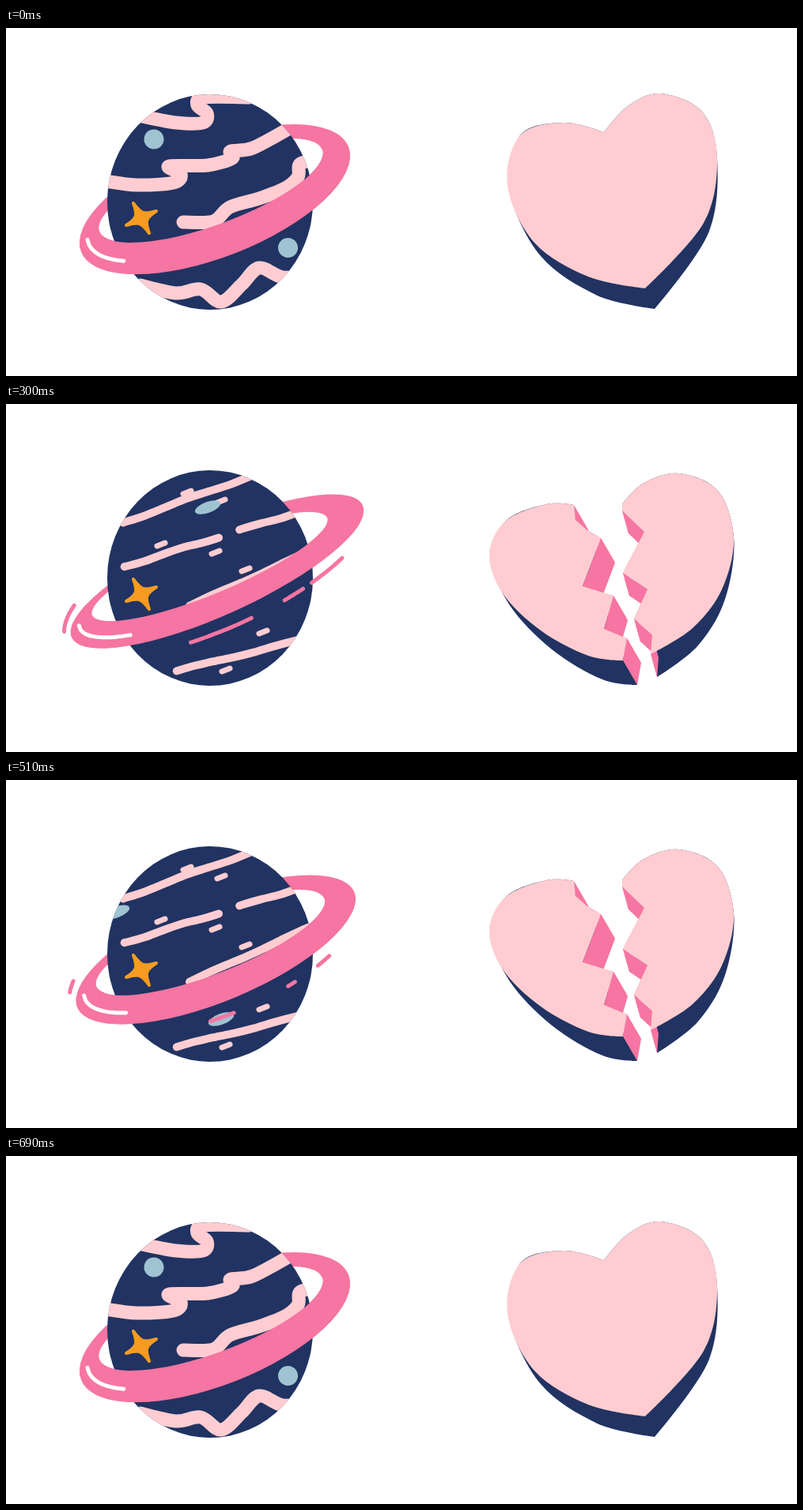
Recreate the animation shown at these times as an HTML page. Size 1000 by 441 pixels, loop 0.72 s.

```html
<!DOCTYPE html>
<html lang="en">
<head>
<meta charset="utf-8">
<title>Planet and heart</title>
<style>
html, body { margin: 0; width: 100%; height: 100%; overflow: hidden; background: #fff; }
svg { display: block; width: 100%; height: 100%; }
</style>
</head>
<body>
<svg id="stage" viewBox="0 0 1000 441"></svg>
<script>
const LOOP = 720, STEP = 30, DEG = Math.PI / 180;
const NAVY = '#213362', BLUSH = '#ffcdd1', PINK = '#f675a2', SKY = '#9fc3d1', GOLD = '#f79b20', WHITE = '#fff';

// Points are "x,y"; a trailing "!" marks a corner.
const parse = s => s.split(' ').map(p => [...p.replace('!', '').split(',').map(Number), p.endsWith('!') ? 1 : 0]);
const lerp = (a, b, k) => Array.isArray(a) ? a.map((v, i) => lerp(v, b[i], k)) : a + (b - a) * k;

// Value of a keyed track at time t, held before the first and after the last key.
function sample(keys, t) {
  const i = keys.findIndex(k => t < k[0]);
  if (i === 0) return keys[0][1];
  if (i < 0) return keys[keys.length - 1][1];
  const [t0, a] = keys[i - 1], [t1, b] = keys[i];
  return lerp(a, b, (t - t0) / (t1 - t0));
}

// Smooth path through points, straight at corners.
function curve(pts, closed = true) {
  const n = pts.length;
  const at = i => pts[closed ? (i + n) % n : Math.max(0, Math.min(n - 1, i))];
  const handle = (i, dir) => {
    const p = at(i), a = at(i - 1), b = at(i + 1), f = dir * (1 - p[2]) / 6;
    return [0, 1].map(j => (p[j] + (b[j] - a[j]) * f).toFixed(1)).join();
  };
  let d = 'M' + at(0).slice(0, 2);
  for (let i = 0; i < (closed ? n : n - 1); i++)
    d += `C${handle(i, 1)} ${handle(i + 1, -1)} ${at(i + 1).slice(0, 2)}`;
  return d + (closed ? 'Z' : '');
}

const fill = (pts, color) => `<path d="${curve(pts)}" fill="${color}"/>`;
const line = (pts, color, w, extra = '') =>
  `<path d="${curve(pts, false)}" fill="none" stroke="${color}" stroke-width="${w}" stroke-linecap="round" ${extra}/>`;

// ---- pace of the spin ----
const calmKeys = [[30, 1], [210, 0], [570, 0], [690, 1]];
const fastKeys = [[240, 0], [300, 1], [540, 1], [570, 0]];
const stretchKeys = [[240, 0], [300, 1], [390, 1], [510, .4], [570, 0]];

// ---- ring: tilted ellipses [cx, cy, a, b, tilt] ----
const outerKeys = [[264, 217, 181.5, 73, 21.5], [267, 212, 202, 55, 24.5]];
const innerKeys = [[259, 206, 150, 43.6, 20.2], [257.5, 206, 161, 35, 22.6]];

function onEllipse([cx, cy, a, b, tilt], angle) {
  const x = a * Math.cos(angle), y = b * Math.sin(angle);
  const c = Math.cos(tilt * DEG), s = Math.sin(tilt * DEG);
  return [cx + x * c + y * s, cy - x * s + y * c, 0];
}
const arc = (e, from, to, n = 6) => Array.from({ length: n + 1 }, (_, i) => onEllipse(e, lerp(from, to, i / n)));
const oval = ([cx, cy, a, b, tilt]) => {
  const side = angle => onEllipse([cx, cy, a, b, tilt], angle).slice(0, 2).map(v => v.toFixed(1));
  const half = angle => `A${a} ${b} ${-tilt} 0 1 ${side(angle)}`;
  return `M${side(0)}${half(Math.PI)}${half(0)}Z`;
};

// Trails behind the ring, as angle ranges on a wider orbit.
const trails = [[3.29, 3.66], [.77, 1.06], [1.13, 1.27], [1.5, 1.9]];

// ---- planet surface: wavy bands, curled up when the planet is calm ----
const bands = [
  { rest: '172,112 215,120 249,120 254,108 242,98 250,88 308,88', from: [130, 157], to: [310, 91], waves: 1.5, amp: 6 },
  { rest: '120,193 165,199 212,196 221,185 206,175 255,174 286,165 284,156 312,152 362,125', from: [125, 214], to: [372, 136], waves: 2.5, amp: 6, dash: '125 28' },
  { rest: '224,246 262,245 283,227 320,216 353,203 369,189 372,172 395,168', from: [214, 264], to: [394, 182], waves: 1.5, amp: -4 },
  { rest: '170,326 215,336 246,331 272,347 298,325 320,304 350,316 385,312', from: [197, 343], to: [385, 296], waves: 1.5, amp: -5 }
].map(b => ({ ...b, rest: parse(b.rest) }));

function band(b, t) {
  const calm = sample(calmKeys, t), fast = sample(fastKeys, t);
  const trim = .1 * fast, phase = t < 300 ? 1 : 0;
  const pts = b.rest.map((p, i) => {
    const u = i / (b.rest.length - 1);
    const [x, y] = lerp(b.from, b.to, trim + (1 - trim) * u);
    const wave = b.amp * (1 - .8 * fast) * Math.sin(2 * Math.PI * b.waves * u + phase);
    return lerp([x, y + wave, 0], p, calm);
  });
  const dash = b.dash && fast > .5 ? `stroke-dasharray="${b.dash}"` : '';
  return line(pts, BLUSH, lerp(17, 10, fast), dash);
}

const flecks = parse('229,112 272,123 196,178 265,188 303,210 325,289 278,337');
const fleck = ([x, y]) => line([[x - 5, y + 2, 0], [x + 5, y - 2, 0]], BLUSH, 7);

// Spots cross the globe; each run is a track of [x, y].
const spotRuns = [
  [[0, [187, 141]], [30, [187, 141]], [210, [205, 140]], [300, [255, 131]], [390, [302, 119]], [420, [322, 113]]],
  [[480, [128, 170]], [570, [164, 162]], [690, [187, 141]]],
  [[0, [356.5, 278.5]], [30, [356.5, 278.5]], [210, [371, 274]], [270, [395, 268]]],
  [[390, [202, 340]], [510, [272, 303]], [570, [302, 296]], [690, [356.5, 278.5]]]
];
function spot(run, t) {
  if (t < run[0][0] || t > run[run.length - 1][0]) return '';
  const calm = sample(calmKeys, t), [x, y] = sample(run, t);
  return `<ellipse rx="${lerp(17, 12.5, calm)}" ry="${lerp(7, 12.5, calm)}" transform="translate(${x} ${y}) rotate(-20)" fill="${SKY}"/>`;
}

const tips = [[161, 222], [190, 232], [181, 260], [152, 250]];
const star = tips.flatMap((p, i) => {
  const middle = lerp(p, tips[(i + 1) % 4], .5);
  return [[...p, 1], [...lerp([171, 241], middle, .5), 0]];
});
const starSvg = `<path d="${curve(star)}" fill="${GOLD}" stroke="${GOLD}" stroke-width="4" stroke-linejoin="round"/>`;

function planet(t) {
  const fast = sample(fastKeys, t), stretch = sample(stretchKeys, t);
  const outer = lerp(...outerKeys, stretch), inner = lerp(...innerKeys, stretch);
  const [cx, cy, a, b, tilt] = outer;
  const orbit = [cx, cy, a + 8, b + 17, tilt];
  const ring = `<path d="${oval(outer)}${oval(inner)}" fill="${PINK}" fill-rule="evenodd"`;
  const globe = `<ellipse cx="258" cy="220.5" rx="130" ry="136.5" fill="${NAVY}"/>`;
  const surface = bands.map(v => band(v, t)).join('') +
    (t >= 270 && t < 630 ? flecks.map(fleck).join('') : '') +
    spotRuns.map(run => spot(run, t)).join('');
  const streaks = fast < .5 ? '' : trails.map(([from, to]) => {
    const mid = (from + to) / 2, half = (to - from) / 2 * stretch;
    return line(arc(orbit, mid - half, mid + half), PINK, 5);
  }).join('');
  return `<clipPath id="globe">${globe}</clipPath><clipPath id="front"><path d="M0 307L520 117V441H0Z"/></clipPath>` +
    ring + '/>' + globe + `<g clip-path="url(#globe)">${surface}</g>` + starSvg +
    ring + ' clip-path="url(#front)"/>' +
    line(arc(lerp(inner, outer, .6), 3.22, lerp(2.5, 2.35, stretch)), WHITE, 5) + streaks;
}

// ---- heart ----
const hearts = {
  rest: parse('756,132! 786,99 827,83 880,106 899,165 882,247 808,330! 736,315 668,272 634,200 650,136 705,120'),
  squash: parse('748,122 798,102 850,85 897,108 914,175 884,254 805,326! 742,316 662,275 615,200 640,139 700,124'),
  mend: parse('756,134! 788,104 838,89 884,110 904,182 880,252 804,331! 728,320 660,275 629,197 655,141 715,124')
};
const heartKeys = [[30, hearts.rest], [210, hearts.squash], [270, hearts.squash]];
const mendKeys = [[570, hearts.mend], [690, hearts.rest]];

// The navy side: the outline sinks further the lower it lies.
function side(pts, [dx, dy]) {
  const top = 165, tip = Math.max(...pts.map(p => p[1]));
  return fill(pts.map(([x, y, c]) => {
    const k = Math.max(0, (y - top) / (tip - top));
    return [x + dx * k, y + dy * k, c];
  }), NAVY);
}

// One half of the broken heart; every edge of the break is swept along the depth.
function piece(rim, teeth, depth) {
  const outline = parse(rim + ' ' + teeth), edge = parse(teeth);
  const drop = ([x, y]) => [x + depth[0], y + depth[1], 1];
  const loop = [outline[rim.split(' ').length - 1], ...edge, outline[0]];
  const faces = loop.slice(1).map((p, i) => [loop[i], p, drop(p), drop(loop[i])]);
  return side(outline, depth) + faces.map(f => fill(f, PINK)).join('') + fill(outline, BLUSH);
}
const leftHalf = piece('780,325! 736,319 676,287 628,240 611,190 632,148 683,127 718,128!',
  '720,147! 735,160! 752,170! 729,231! 768,243! 756,285! 785,297!', [18, 31]);
const rightHalf = piece('779,127! 805,101 850,88 900,110 920,170 905,235 868,284 815,317!',
  '817,293! 794,272! 811,235! 780,214! 807,162! 779,135!', [8, 29]);

const crack = fill(parse('746,132! 756,116! 766,123! 763,150! 783,179! 768,207! 768,224! 766,166! 753,157!'), WHITE) +
  ['747,135! 755,147 752,159 743,152', '763,148! 787,167 783,179!', '766,176! 768,210 790,239! 766,222 753,217!']
    .map(s => fill(parse(s), PINK)).join('');

function heart(t) {
  if (t >= 270 && t < 570) {
    const shut = t === 270 || t === 540 ? 6 : 0;
    return `<g transform="translate(${shut})">${leftHalf}</g><g transform="translate(${-shut})">${rightHalf}</g>`;
  }
  const pts = sample(t < 270 ? heartKeys : mendKeys, t);
  const open = t < 570 ? 0 : (690 - t) / 120;
  return side(pts, [12, 26]) + fill(pts, BLUSH) +
    (open ? `<g transform="translate(756 130) scale(${open}) translate(-756 -130)">${crack}</g>` : '');
}

const stage = document.getElementById('stage');
const start = performance.now();
let shown = -1;
function tick() {
  const t = Math.floor((performance.now() - start) % LOOP / STEP) * STEP;
  if (t !== shown) {
    shown = t;
    stage.innerHTML = planet(t) + heart(t);
  }
  requestAnimationFrame(tick);
}
tick();
</script>
</body>
</html>
```
